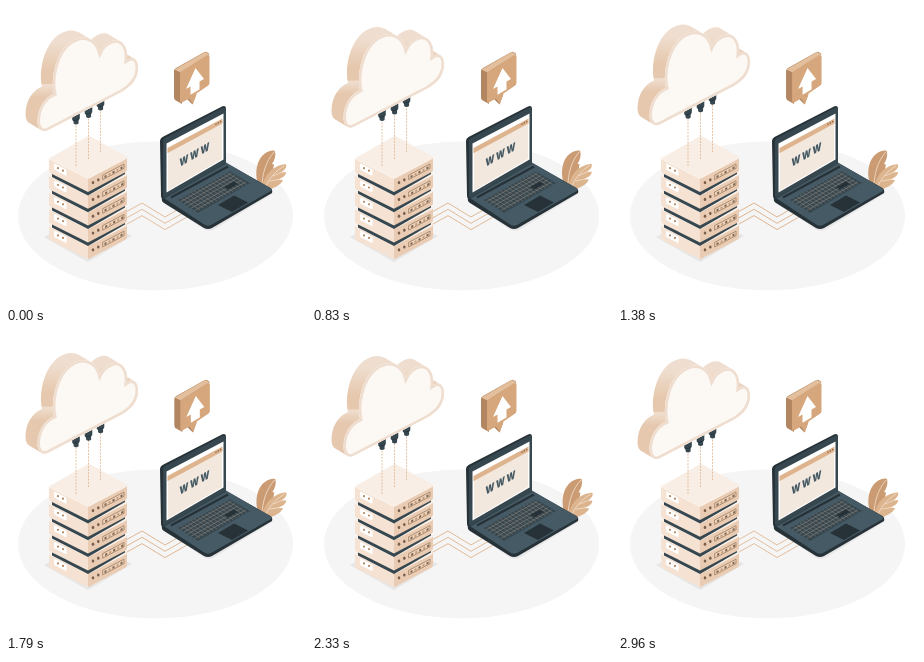
An HTML page for the animation above (3000 ms loop, 300 px wide and 300 px high).

```html
<!DOCTYPE html>
<html lang="en">
<head>
<meta charset="utf-8">
<title>Cloud hosting</title>
<style>
  html, body { margin: 0; width: 100%; height: 100%; overflow: hidden; background: #fff; }
  svg { display: block; width: 100vw; height: 100vh; }
  text { font: 900 10px Inter, "Liberation Sans", sans-serif; }
</style>
</head>
<body>
<svg id="stage" viewBox="0 0 300 300"></svg>
<script>
const LOOP = 3000;
const stage = document.getElementById('stage');
const ink = '#263238', steel = '#37474f', slate = '#455a64';
const tan = '#d6a67c', brown = '#b28660', pale = '#efdecf', cream = '#fcf8f4';

function add(parent, tag, attrs) {
  const el = document.createElementNS('http://www.w3.org/2000/svg', tag);
  for (const key in attrs) el.setAttribute(key, attrs[key]);
  parent.appendChild(el);
  return el;
}
const group = (parent, attrs = {}) => add(parent, 'g', attrs);
const path = (parent, d, fill, extra = {}) => add(parent, 'path', { d, fill, ...extra });
const line = (parent, d, stroke, width, extra = {}) =>
  path(parent, d, 'none', { stroke, 'stroke-width': width, ...extra });
const round = { 'stroke-linejoin': 'round', 'stroke-linecap': 'round' };

add(stage, 'ellipse', { cx: 149.5, cy: 210, rx: 137.5, ry: 74.5, fill: '#f5f5f5' });

// Cables from the servers to the laptop
const cables = group(stage);
for (let i = 0; i < 3; i++) {
  const y = 197 + i * 6.3, run = 12 + i * 5.5;
  line(cables, `M120 ${y + 9}L136 ${y}L159 ${y + 14}l${run} ${-run * .57}`, '#dfb590', 1, round);
}

// Server stack
path(stage, 'M38 231L83 207L126 230L82 256Z', '#e6e6e6');
const rack = group(stage);
function server(i) {
  const g = group(rack, { transform: `translate(0 ${i * 16.8})` });
  if (i < 4) path(g, 'M46 164L82 182L119 162V168L82 189.5L46 171Z', steel);
  path(g, 'M43 152.5L82 172V186L45 167.5Q43 166.5 43 164.5Z', '#f5e2d3');
  path(g, 'M82 172L121 151.5V163.5Q121 165.5 119 166.5L82 186Z', '#e9ccb3');
  path(g, 'M45 151.2L81 130.7Q83 129.5 85 130.7L119.5 150Q122 151.5 119.5 153L84 171.7Q82 172.7 80 171.7L45 154Q42 152.6 45 151.2Z', '#f8eee5');
  line(g, 'M44 153.3L80 171.5Q82 172.5 84 171.5L120.5 152.3', '#fdf6f0', .7, round);
  path(g, 'M49 158.2L60 163.8V169.3L49 163.7Z', '#fff', { stroke: '#fff', 'stroke-width': 1, ...round });
  for (const [x, cy] of [[52, 162.2], [57, 164.7]])
    add(g, 'circle', { cx: x, cy, r: 1.1, fill: brown });
  for (const [x, cy] of [[87, 176.6], [92.3, 173.8]])
    add(g, 'ellipse', { cx: x, cy, rx: 1.3, ry: 1.6, fill: '#7b5f4a' });
  path(g, 'M97 169L118 158V162.4L97 173.5Z', '#edd3bd', { stroke: '#94714f', 'stroke-width': .7, ...round });
  for (let n = 0; n < 5; n++) {
    const x = 98.5 + n * 4 + (i % 2) * .7, y = 169.8 - (x - 98.5) * .53;
    path(g, `M${x} ${y}l2 -1.1v2.2l-2 1.1z`, n % 2 ? '#c29a78' : '#7b5f4a');
  }
}
for (let i = 4; i >= 0; i--) server(i);

// Plant
const plant = group(stage);
path(plant, 'M253 180C249 172 249 158 256 150C260 146 265 143.5 269 145C270 149 269 154 266 158L268 158.5C267 166 264 174 258 182Z', '#cb9c73');
line(plant, 'M256 181C256 168 260 155 268 146', '#f3e0cf', .8, round);
path(plant, 'M256 184C257 173 262 165 270 161C274 159 278 158 280 158.5C281 161 279 164 275 166.5L280 166C280 170 276 172 272 173.5L277 174C275 179 268 182 262 184Z', '#dcb48e');
line(plant, 'M259 183C262 174 268 166 278 160M264 175L273 173.5M267 170L275 166.5', '#f5e6d8', .7, round);

// Laptop
const laptop = group(stage);
path(laptop, 'M156 194L203 221L266 186V188L208 223.5Q203 226 198 223.5Z', '#e6e6e6');
path(laptop, 'M156 192L220 157L264.5 182Q267 184 266 187L206 222Q202 224 198 222L158 197Q155 195 156 192Z', ink);
path(laptop, 'M157 191.5L220 156.5L264 182Q267 184 264 185.5L205 219Q202 220.5 199 219Z', slate);
path(laptop, 'M154 135Q154 132.5 156.5 131L216 100.5Q220 99 220 103V157.5L159 192Q155 194 155 190Z', ink);
path(laptop, 'M157 135Q157 133 159 132L216.5 102Q220 101 220 104V157.5L159 191.5Q157 192 157 190Z', steel);
path(laptop, 'M160.5 137.5L217.5 107.5V153.5L160.5 186.5Z', '#fff');
path(laptop, 'M162 147L216 117.5V153L162 184.5Z', '#f3e8dd');
path(laptop, 'M161.5 142L216.5 112.5V117.5L161.5 147.3Z', '#deb48f');
for (let i = 0; i < 3; i++)
  add(laptop, 'circle', { cx: 210 + i * 2.3, cy: 118.2 - i * 1.3, r: .8, fill: '#8b6748' });
const label = add(laptop, 'text', { transform: 'matrix(.83 -.48 0 1.1 173.5 161)', fill: slate, 'letter-spacing': 1.6 });
label.textContent = 'WWW';
line(laptop, 'M165 191.5L222 160.5', ink, 2);
path(laptop, 'M172 194L224 165.5L244 177L192 207Z', steel);
for (let i = 1; i < 6; i++)
  line(laptop, `M${171 + i * 3.5} ${193.5 + i * 2.2}l51 -28.5`, '#9a8f84', .5);
for (let i = 1; i < 16; i++)
  line(laptop, `M${172 + i * 3.3} ${194 - i * 1.81}l19 11.6`, '#9a8f84', .4);
path(laptop, 'M218 181L228 175.5L232 178L222 183.5Z', ink);
path(laptop, 'M212 199L228 189.5L242 196.5L226 206Z', ink);

// Upload sign
const sign = group(stage);
path(sign, 'M168 65Q168 63 170 62L198 46.3Q200 45.3 201 46.3L203.5 48L176 66V98L169 94Q168 93 168 91Z', brown);
path(sign, 'M168.5 63.5L199 46L203 48L174.5 66.5Z', '#e3bf9d');
path(sign, 'M181 93L186.5 98.5L190.5 88Z', brown);
path(sign, 'M174 68Q174 66 176 65L201 49.5Q203.5 48 203.5 50.5V77Q203.5 79 201.5 80L190.5 87.5L187 98L183 92.5L176 96.5Q174 97.5 174 95Z', tan);
path(sign, 'M189.5 62L198 73L193.5 75.5V83.5L184.5 88.7V80.5L180 83Z', '#fff');

// Dashed links and cloud
const plugs = [[70, 108, 160], [82.5, 101.5, 153], [94.5, 94, 146]];
const links = plugs.map(() => line(stage, '', '#deb48f', .8, { 'stroke-dasharray': '2 1.2' }));
const cloud = group(stage);
for (const [x, y] of plugs) {
  path(cloud, `M${x - 3.8} ${y - 1}L${x + 3.8} ${y - 4.5}V${y + 5}L${x + 2.6} ${y + 7}V${y + 10}Q${x} ${y + 12} ${x - 2.4} ${y + 10}V${y + 8}L${x - 3.8} ${y + 6.5}Z`, steel);
  line(cloud, `M${x - 2.4} ${y + 7.3}L${x + 2.6} ${y + 6}`, ink, .8);
}
const puff = 'M31.5 116C31.5 102 38.5 92 48 88C44.5 73 49.5 48 63.5 37C77.5 27 90.5 33 94 46C98.5 37 110.5 31 116.5 37.5C121 42 121.5 48 121 54C128 49.5 132 55 132 62C132 73 126 80 116 86L42 124.5C36 127.5 31.5 123 31.5 116Z';
const defs = add(stage, 'defs', {});
const shade = add(defs, 'linearGradient', { id: 'shade', gradientUnits: 'userSpaceOnUse', x1: 0, y1: 24, x2: 0, y2: 124 });
for (const [offset, color] of [[.12, pale], [.4, '#e6c8ae'], [.54, '#e6c8ae'], [.55, pale], [.68, '#e6c8ae']])
  add(shade, 'stop', { offset, 'stop-color': color });
path(add(defs, 'clipPath', { id: 'rim' }), puff, ink);

// The side wall is the face swept up and to the left
const wall = add(defs, 'clipPath', { id: 'wall' });
for (let i = 0; i <= 24; i++)
  path(wall, puff, ink, { transform: `translate(${-i / 2} ${-i * .3})` });
add(cloud, 'rect', { x: 10, y: 15, width: 130, height: 120, fill: 'url(#shade)', 'clip-path': 'url(#wall)' });
path(cloud, puff, cream);
line(cloud, puff, pale, 5, { 'clip-path': 'url(#rim)' });

function draw(now) {
  const t = now % LOOP;
  const wave = period => (1 - Math.cos(2 * Math.PI * t / period)) / 2;
  const lift = -.4 - 6 * wave(LOOP);
  cloud.setAttribute('transform', `translate(0 ${lift})`);
  plugs.forEach(([x, y, end], i) => links[i].setAttribute('d', `M${x} ${end}V${y + 11 + lift}`));
  sign.setAttribute('transform', `translate(${wave(LOOP / 2)} 0)`);
  plant.setAttribute('transform', `rotate(${-1.2 * Math.sin(2 * Math.PI * t / LOOP)} 258 182)`);
  cables.setAttribute('opacity', .85 + .15 * wave(LOOP));
}
function tick() {
  draw(performance.now());
  requestAnimationFrame(tick);
}
tick();
</script>
</body>
</html>
```
